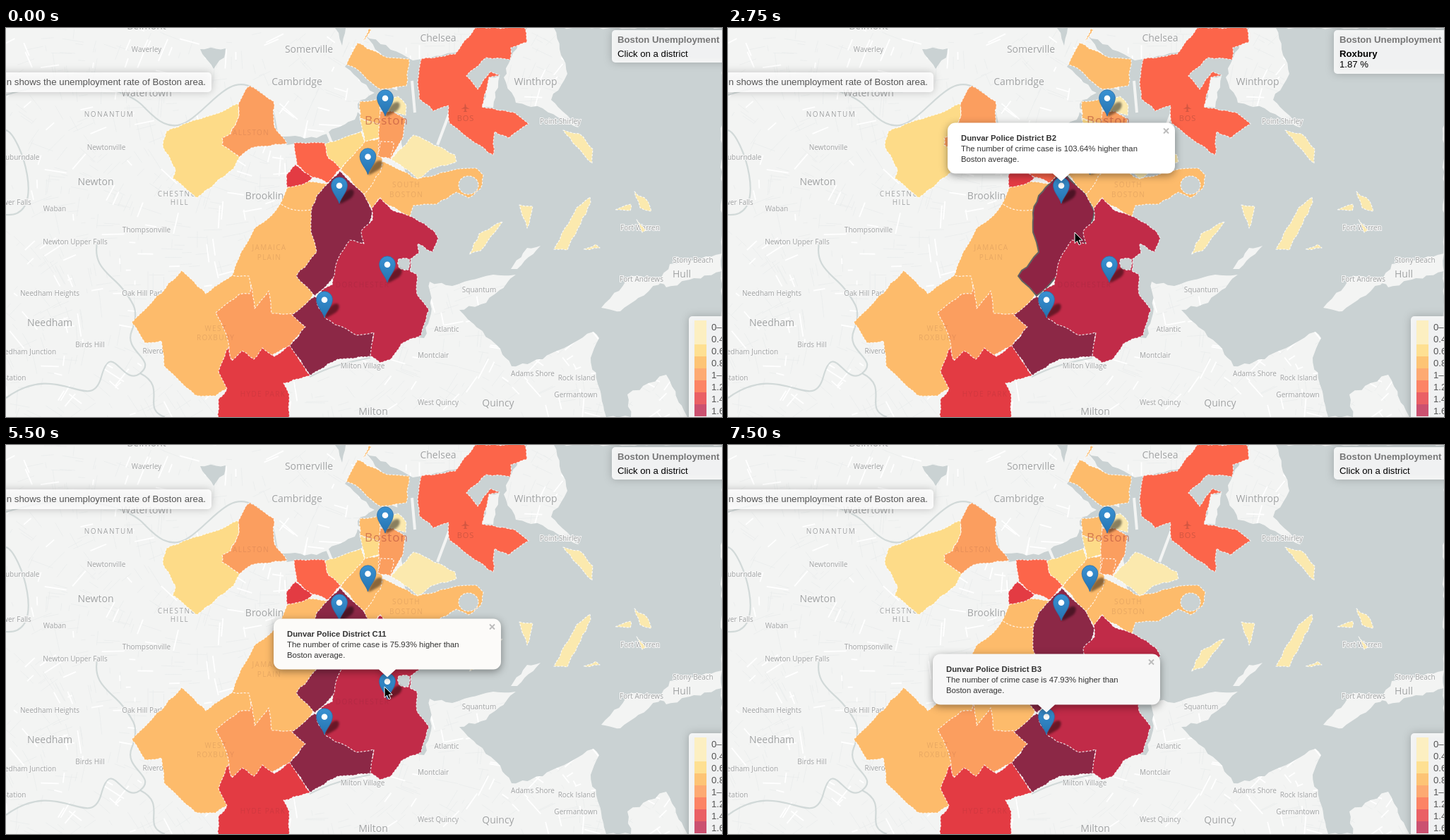
These frames come from a looping animation (1014x552 px, 8.25 s). An HTML page:

```html
<!DOCTYPE html>
<html lang="en">
<head>
<meta charset="utf-8">
<title>Unemployment map</title>
<style>
html, body { margin: 0; width: 100%; height: 100%; overflow: hidden; background: #f3f4f3; }
svg { display: block; width: 1014px; height: 552px; font: 13.2px "Liberation Sans", Arial, sans-serif; }
.place { font-family: "Open Sans", sans-serif; fill: #a0a3a3; stroke: #f6f6f6; stroke-width: 2px; paint-order: stroke; }
.region { stroke: #fff; stroke-opacity: .8; stroke-width: 1.2; stroke-dasharray: 3 2; stroke-linejoin: round; }
.region.hover { stroke: #666; stroke-opacity: 1; stroke-width: 2; stroke-dasharray: none; filter: brightness(.96) saturate(1.1); }
.panel { fill: #fff; fill-opacity: .84; filter: drop-shadow(0 0 6px rgba(0,0,0,.25)); }
.inner { fill: #50202a; fill-opacity: .12; font: 10px "Open Sans", sans-serif; letter-spacing: 1.3px; }
#popup { font-size: 11.3px; fill: #333; }
</style>
</head>
<body>
<svg id="stage" viewBox="0 0 1014 552"></svg>
<script>
const LOOP = 8250, TICK = 250;
const WATER = '#cad2d3', LAND = '#f3f4f3';
const AMBER = '#fdbb6b', YELLOW = '#fddb88', PALE = '#fbe9ae', ORANGE = '#fb9e5f';
const CORAL = '#fc654a', RED = '#e33b43', CRIMSON = '#c12b48', WINE = '#8c2846';

// Key corners only. Later districts overlap earlier ones, so a shared border is given once.
const districts = {
  jamaica: [AMBER, '412 218 398 227 388 250 376 266 352 284 330 326 320 352 345 410 420 410 470 300 455 221'],
  westRoxbury: [AMBER, '249 344 283 377 320 351 344 352 350 400 330 460 313 512 297 522 268 521 224 480 220 444 197 447 178 418'],
  roslindale: [ORANGE, '297 404 330 378 345 377 347 364 352 398 372 373 376 405 406 405 424 424 402 452 340 480 318 470 312 435'],
  hydePark: [RED, '315 453 320 472 334 458 351 470 363 454 380 466 402 450 431 493 393 504 401 520 401 556 301 556 301 526 313 512 301 488'],
  mattapan: [WINE, '437 381 475 400 521 432 516 466 470 470 431 493 402 451 424 424 405 407'],
  roxbury: [WINE, '473 203 507 236 519 260 510 300 470 350 437 380 411 352 440 318 432 290 432 262 440 238'],
  southBoston: [AMBER, '533 189 583 214 640 200 666 199 676 209 672 228 655 241 638 233 610 250 577 252 572 269 527 243 519 258 507 236'],
  dorchester: [CRIMSON, '530 241 546 258 577 269 606 288 612 298 604 318 583 306 585 319 573 328 572 345 582 350 582 378 599 400 588 436 560 448 545 470 530 475 516 465 521 432 496 436 452 412 440 390 447 372 462 364 470 328 487 301 507 306 503 288 519 272 518 256'],
  seaport: [PALE, '545 186 577 152 636 180 638 190 602 200 583 214 570 202'],
  southEnd: [AMBER, '474 201 508 160 528 157 533 189 530 205 507 236'],
  backBay: [YELLOW, '451 165 503 147 508 161 474 200 457 185'],
  fenway: [CORAL, '408 163 451 163 457 185 474 200 455 220 425 207 412 194'],
  longwood: [RED, '397 208 410 194 434 213 420 222 398 226'],
  brighton: [YELLOW, '300 121 330 107 330 125 318 151 306 158 331 183 322 200 270 241 236 213 240 200 222 168 227 147 258 134'],
  allston: [ORANGE, '337 92 345 82 379 104 380 140 398 164 348 170 331 183 306 166 306 156 318 150 330 125 329 108'],
  charlestown: [AMBER, '498 21 540 42 571 44 567 82 530 87 495 57 482 52'],
  mystic: [AMBER, '514 0 517 3 505 20'],
  westEnd: [AMBER, '501 104 530 101 530 140 501 128'],
  beacon: [YELLOW, '501 128 530 138 528 156 508 161'],
  northEnd: [PALE, '540 101 555 97 567 110 566 124 542 119'],
  downtown: [ORANGE, '530 118 548 118 566 130 562 156 545 186 526 182'],
  leather: [ORANGE, '530 161 549 162 545 186 526 181'],
  eastBoston: [CORAL, '664 0 735 0 738 20 715 28 714 45 680 42 652 68 668 87 686 62 699 67 684 70 674 112 720 120 740 136 712 156 692 147 690 180 664 163 628 135 627 110 605 118 585 100 583 75 588 44 636 37'],
  deer: [PALE, '789 145 812 150 831 172 830 192 808 168'],
  long: [PALE, '827 240 828 248 795 315 776 314 808 255'],
  spectacle: [PALE, '727 251 746 253 738 284'],
  thompson: [PALE, '703 275 672 316 656 321 670 292'],
  outer: [PALE, '890 232 909 246 914 260 898 255'],
  gallops: [PALE, '863 258 885 250 884 259'],
  georges: [PALE, '893 272 906 287 901 290'],
  rainsford: [PALE, '818 314 835 307 841 312']
};

const towns = 'Belmont|199|2;Somerville|429|35;Chelsea|612|19;Cambridge|412|81;Watertown|199|97;Newton|127|223;Brookline|370|243;Needham|62|423;Milton|520|549;Quincy|697|537;Winthrop|750|81;Hull|957|354';
const villages = 'Waverley|199|34;Newtonville|142|173;Auburndale|20|187;Lower Falls|10|251;Waban|69|260;Thompsonville|199|290;Newton Upper Falls|98|307;Needham Heights|62|380;Oak Hill Park|194|380;Birds Hill|119|453;Needham Junction|28|463;Riverdale|215|462;Station|12|500;Milton Village|505|483;Atlantic|624|431;Montclair|605|468;Squantum|670|375;West Quincy|612|535;Adams Shore|746|494;Rock Island|808|500;Germantown|807|524;Point Shirley|785|136;Fort Warren|898|287;Fort Andrews|900|360;Stony Beach|973|333';
const spaced = 'NONANTUM|146|126;CHESTNUT|246|239;HILL|246|251';
const innerNames = 'ALLSTON|347|152;SOUTH|567|226;BOSTON|567|240;JAMAICA|373|315;PLAIN|373|329;WEST|297|430;ROXBURY|297|443;HYDE PARK|364|523;DORCHESTER|505|368';

const pins = { north: [537, 125], d4: [512.5, 208], B2: [472, 249], C11: [540, 361], B3: [451, 411] };

const easeOut = u => 1 - (1 - u) ** 2.5;
const smooth = u => u * u * (3 - 2 * u);
const moves = [
  { start: 250, end: 1000, from: [591, 114], to: [467, 227], ease: easeOut },
  { start: 2250, end: 3250, from: [467, 227], to: [515, 352], ease: smooth },
  { start: 3250, end: 3500, from: [515, 352], to: [489, 365], ease: smooth },
  { start: 4100, end: 5000, from: [489, 365], to: [536, 343], ease: smooth },
  { start: 5750, end: 6750, from: [536, 343], to: [444, 391], ease: easeOut },
  { start: 7000, end: 7250, from: [444, 391], to: [628, 33], ease: smooth }
];
const hovers = [
  { start: 0 },
  { start: 2750, id: 'roxbury', name: 'Roxbury', rate: 1.87 }, { start: 3000 },
  { start: 3250, id: 'dorchester', name: 'Dorchester', rate: 1.49 }, { start: 4750 },
  { start: 6000, id: 'dorchester', name: 'Dorchester', rate: 1.49 }, { start: 6500 }
];
const popups = [
  { start: 0 },
  { start: 2000, district: 'B2', percent: 103.64, fill: '#fff' },
  { start: 5500, district: 'C11', percent: 75.93, fill: '#fcfbf9' },
  { start: 7000, district: 'B3', percent: 47.93, fill: '#f7f7f7' }
];

let seed = 7;
const random = () => (seed = (seed * 16807) % 2147483647) / 2147483647;

// Joins the corners with slightly irregular edges, like a surveyed coast
function outline(corners, rough = 1.2) {
  const n = corners.split(' ').map(Number);
  let d = '';
  for (let i = 0; i < n.length; i += 2) {
    const [x, y] = [n[i], n[i + 1]];
    const dx = n[(i + 2) % n.length] - x, dy = n[(i + 3) % n.length] - y;
    const steps = Math.ceil(Math.hypot(dx, dy) / 9);
    for (let k = 0; k < steps; k++) {
      const jitter = () => k ? (random() - .5) * 2 * rough : 0;
      d += `${d ? 'L' : 'M'}${x + dx * k / steps + jitter()} ${y + dy * k / steps + jitter()}`;
    }
  }
  return d + 'Z';
}
const land = (fill, ...shapes) => shapes.map(s => `<path d="${outline(s, 2)}" fill="${fill}"/>`).join('');

const labels = (list, attrs) => list.split(';').map(item => {
  const [text, x, y] = item.split('|');
  return `<text x="${x}" y="${y}" text-anchor="middle" ${attrs}>${text}</text>`;
}).join('');

function streets() {
  let minor = '', major = '';
  for (let i = 0; i < 1600; i++) {
    const x = random() * 1014, y = random() * 552, length = 6 + random() * 28;
    const angle = Math.sin(x / 130) + Math.cos(y / 110) + (random() < .5 ? Math.PI / 2 : 0);
    const line = `M${x} ${y}l${length * Math.cos(angle)} ${length * Math.sin(angle)}`;
    if (i % 4) minor += line; else major += line;
  }
  return `<path d="${minor}" stroke="#e9ebeb" stroke-width=".7"/><path d="${major}" stroke="#fff" stroke-width="1.8"/>`;
}

function baseMap() {
  const harbour = '776 0 784 30 795 65 772 102 812 142 760 114 722 106 705 70 712 50 738 0 668 0 640 34 576 46 508 10 550 60 570 260 540 320 575 440 592 440 602 405 600 360 632 366 690 350 722 350 680 390 642 400 700 455 716 480 760 470 832 431 840 440 828 468 838 505 850 552 885 552 880 520 935 492 965 552 1014 552 1014 0';
  const charles = '386 154 440 156 494 130 498 108 522 92 480 55 490 45 530 86 578 90 570 120 500 148 450 166 398 166';
  return `<rect width="1014" height="552" fill="${LAND}"/>${streets()}
    ${land(WATER, harbour, charles, '275 30 311 29 309 42 294 58', '466 0 481 0 476 25')}
    <g fill="none" stroke="${WATER}" stroke-width="2.2" stroke-opacity=".8">
      <path d="M386 156C378 130 385 105 350 85S290 112 258 132 205 120 190 107 110 60 0 95"/>
      <path d="M0 265C60 270 20 150 0 145M130 300C120 340 150 350 165 370S190 400 178 430 215 470 190 490 150 440 135 495 75 470 0 525"/>
      <path d="M190 490C230 510 190 540 225 552M516 468C480 475 460 480 430 495"/>
    </g>
    ${land(LAND, '684 70 699 68 690 113 674 112', '925 362 940 335 1014 320 1014 345 935 368', '843 397 885 352 930 358 870 402', '715 342 738 312 757 309 724 342')}
    <path d="M629 118L611 166M575 75L579 120M455 148L462 165M492 111L506 124" stroke="${LAND}" stroke-width="4"/>
    ${labels(towns, 'class="place" font-size="14"')}
    ${labels(villages, 'class="place" font-size="10"')}
    ${labels(spaced, 'class="place" font-size="10" letter-spacing="1.5"')}`;
}

function overlay() {
  const shapes = Object.entries(districts).map(([id, [fill, corners]]) =>
    `<path id="${id}" class="region" fill="${fill}" d="${outline(corners)}"/>`).join('');
  return `${shapes}
    <path d="M390 250Q405 262 432 258" class="region" fill="none"/>
    <g class="region">
      <ellipse cx="655" cy="223" rx="14" ry="13" fill="${WATER}"/>
      ${land(WATER, '556 328 571 328 570 343 557 341')}
    </g>
    ${labels(innerNames, 'class="inner"')}
    <g fill="#b54d3c" fill-opacity=".6" text-anchor="middle" font-family="Open Sans, sans-serif">
      <text x="539" y="137" font-size="17" letter-spacing="1">Boston</text>
      <text x="651" y="132" font-size="11" letter-spacing="1">BOS</text>
      <path d="M650 107l1.5 3v2l5 3-5-.5v3l2 1.5h-6l2-1.5v-3l-5 .5 5-3v-2z"/>
    </g>`;
}

const pin = ([x, y]) => `<g transform="translate(${x} ${y})">
  <path d="M0 0C3-10 9-19 16-20S22-10 14-6 5 0 0 0Z" opacity=".45" filter="url(#blur)"/>
  <path d="M0 0C-2-8-11.4-16-11.4-25.8A11.4 11.4 0 0 1 11.4-25.8C11.4-16 2-8 0 0Z" fill="url(#blue)" stroke="#2b6da5" stroke-width=".8"/>
  <circle cy="-25.3" r="4.3" fill="#fff"/></g>`;

function legend() {
  const colors = ['#fcefc1', '#fcefc1', '#fee092', '#fdc475', '#fdaa72', '#fc8465', '#ea6065', '#cb5170'];
  const grade = i => +(i && (i + 1) * .2).toFixed(1);
  return '<rect class="panel" x="967" y="409" width="80" height="170" rx="5"/>' + colors.map((color, i) =>
    `<rect x="975" y="${415 + i * 17}" width="17" height="17" fill="${color}"/>
     <text x="999" y="${429 + i * 17}" fill="#555">${grade(i)}–${grade(i + 1)}</text>`).join('');
}

const get = id => document.getElementById(id);
get('stage').innerHTML = `<defs>
    <linearGradient id="blue" x2="0" y2="1"><stop stop-color="#3a92d3"/><stop offset="1" stop-color="#2573b0"/></linearGradient>
    <filter id="blur" x="-40%" y="-40%" width="180%" height="180%"><feGaussianBlur stdDeviation="1.8"/></filter>
  </defs>
  ${baseMap()}${overlay()}${Object.values(pins).map(pin).join('')}
  <g id="popup"></g>
  <rect class="panel" x="-20" y="63" width="311" height="28" rx="5"/>
  <text x="283" y="81" text-anchor="end" font-size="13.3" fill="#555">on shows the unemployment rate of Boston area.</text>
  <g id="info"></g>${legend()}
  <path id="cursor" d="M0 0V15.5L3.6 12.2 6 17.8 8.6 16.7 6.2 11.2H11Z" stroke="#fff"/>`;

function popupMarkup({ district, percent, fill }) {
  if (!district) return '';
  const [x, y] = pins[district];
  return `<g transform="translate(${x - 161} ${y - 114.5})">
    <path d="M11 0H311A11 11 0 0 1 322 11V61A11 11 0 0 1 311 72H173L161 83 149 72H11A11 11 0 0 1 0 61V11A11 11 0 0 1 11 0Z"
      fill="${fill}" style="filter:drop-shadow(0 3px 6px rgba(0,0,0,.4))"/>
    <text x="19" y="25" font-weight="bold">Dunvar Police District ${district}</text>
    <text x="19" y="40">The number of crime case is ${percent}% higher than</text>
    <text x="19" y="55">Boston average.</text>
    <path d="M306 8l7 7m0-7l-7 7" stroke="#bbb" stroke-width="1.8"/>
  </g>`;
}

function infoMarkup({ name, rate }) {
  return `<rect class="panel" x="858" y="3" width="180" height="${name ? 62 : 46}" rx="5"/>
    <text x="866" y="21" font-weight="bold" fill="#777">Boston Unemployment</text>` +
    (name ? `<text x="866" y="41" font-weight="bold">${name}</text><text x="866" y="56">${rate} %</text>`
          : '<text x="866" y="41">Click on a district</text>');
}

const at = (steps, time) => steps.findLast(step => step.start <= time);

function drawCursor(time) {
  const move = at(moves, time);
  const visible = move && time < 7500;
  get('cursor').setAttribute('visibility', visible ? 'visible' : 'hidden');
  if (!visible) return;
  const u = move.ease(Math.min(1, (time - move.start) / (move.end - move.start)));
  const [x, y] = move.from.map((from, axis) => from + (move.to[axis] - from) * u);
  get('cursor').setAttribute('transform', `translate(${Math.round(x)} ${Math.round(y)})`);
}

let shownTime;
function draw(now) {
  const time = Math.floor(now % LOOP / TICK) * TICK;
  if (time === shownTime) return;
  shownTime = time;
  const hover = at(hovers, time);
  drawCursor(time);
  get('popup').innerHTML = popupMarkup(at(popups, time));
  get('info').innerHTML = infoMarkup(hover);
  for (const id in districts) get(id).classList.toggle('hover', id === hover.id);
}

const start = performance.now();
function tick() {
  draw(performance.now() - start);
  requestAnimationFrame(tick);
}
tick();
</script>
</body>
</html>
```
